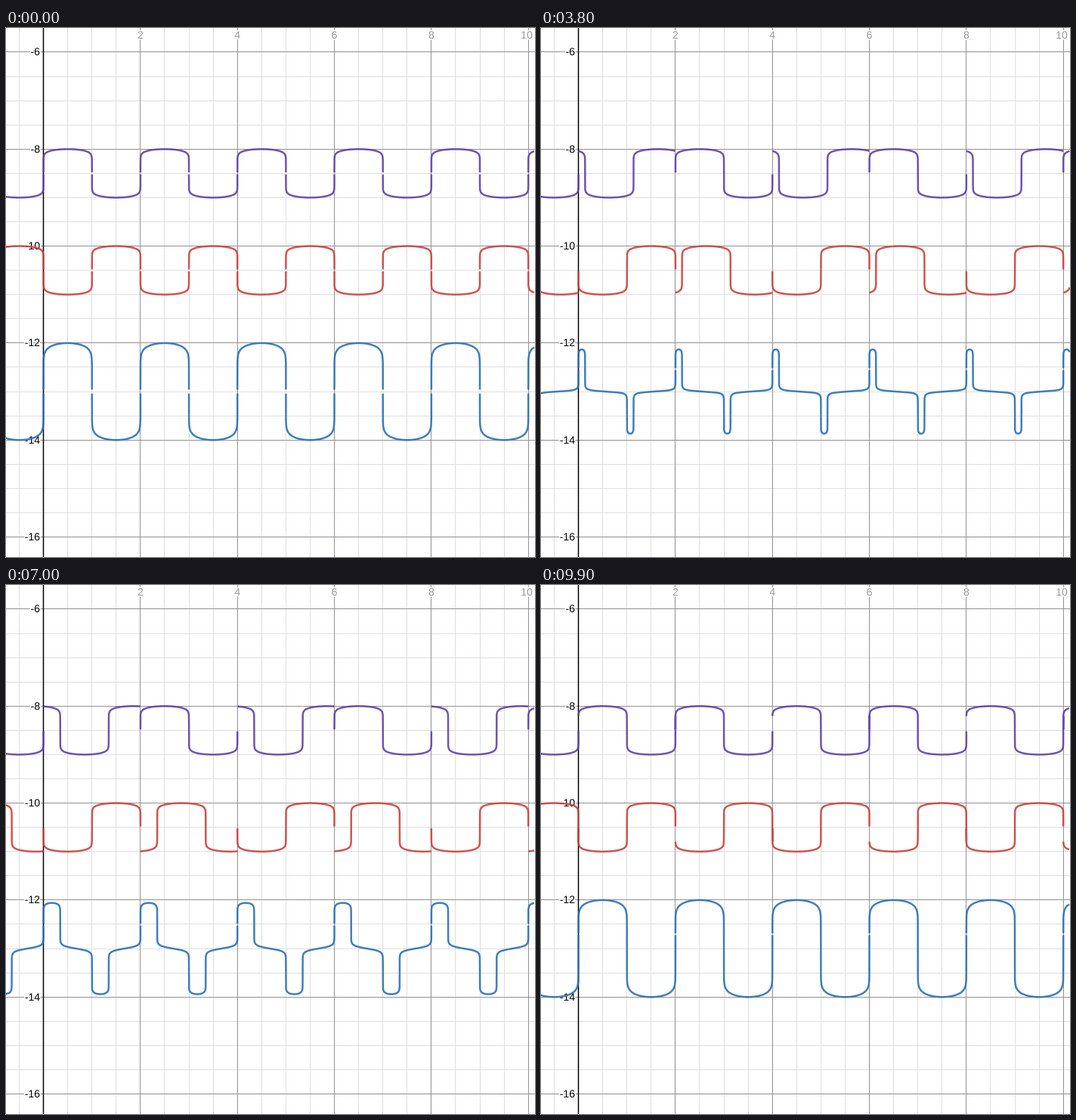
A matplotlib script that plays this animation: 700x700 px, repeating every 10000 ms.

```python
import numpy as np
import matplotlib.pyplot as plt
from matplotlib import patheffects
from matplotlib.animation import FuncAnimation

SIZE, DPI, FRAMES, STEP_MS = 700, 100, 100, 100
PX = 72 / DPI            # one pixel in points
UNIT = 64.16             # pixels per graph unit
X0, Y6 = 49.58, 31.95    # pixel of x = 0 and of y = -6
PURPLE, RED, BLUE = "#6042a6", "#c74440", "#2d70b3"

plt.rcParams["font.family"] = "Liberation Sans"


def px(x):
    return X0 + UNIT * x


def py(y):
    return Y6 - UNIT * (y + 6)


def wave(x):
    """Rounded square wave of period 2 and height 1."""
    s = np.sin(np.pi * x)
    return 0.5 * np.sign(s) * np.abs(s) ** (1 / 11)


NEAR = np.geomspace(1e-16, 1, 120)


def samples(shift):
    """Points on one period, dense around every steep edge."""
    parts = [np.linspace(0, 2, 201)[1:], [1.0, 2.0]]
    for c in (0, 1 - shift, 1, 2 - shift, 2):
        parts += [c - NEAR, c + NEAR]
    u = np.unique(np.concatenate(parts))
    return u[(u > 0) & (u <= 2)]


def curves(shift):
    u = samples(shift)
    still, moved = wave(u), wave(u + shift)
    if shift == 0:
        still[u == 1] = moved[u == 1] = np.nan
    xs, tops, mids = [], [], []
    for start in range(-2, 12, 2):
        a, b = (moved, still) if start % 4 == 0 else (still, moved)
        xs.append(np.append(u + start, np.nan))
        tops.append(np.append(a, np.nan))
        mids.append(np.append(-b, np.nan))
    x, top, mid = map(np.concatenate, (xs, tops, mids))
    x = px(x)
    x[x > SIZE - 0.5] = np.nan   # plot only inside the view
    return x, (py(top - 8.5), py(mid - 10.5), py(top - mid - 13))


fig = plt.figure(figsize=(SIZE / DPI, SIZE / DPI), dpi=DPI, facecolor="white")
ax = fig.add_axes([0, 0, 1, 1])
ax.set_xlim(0, SIZE)
ax.set_ylim(SIZE, 0)
ax.axis("off")


def grid(values, to_px, draw):
    # Lines sit on pixel centres already, so snapping would move them.
    for v in values:
        major = v % 2 == 0
        draw(np.floor(to_px(v)) + 0.5, 0, 1, lw=PX, snap=False,
             color="#919191" if major else "#dedede",
             zorder=2 if major else 1)


def label(x, y, text, color, align):
    halo = patheffects.withStroke(linewidth=3 * PX, foreground="white")
    ax.text(x, y, text, color=color, ha=align, va="baseline",
            fontsize=14 * PX, zorder=4, path_effects=[halo])


grid(np.arange(-0.5, 10.5, 0.5), px, ax.axvline)
grid(np.arange(-16, -5, 0.5), py, ax.axhline)
ax.axvline(np.floor(X0) + 0.5, lw=1.5 * PX, color="black", zorder=3,
           snap=False)

for n in range(2, 11, 2):
    label(min(px(n), 689), 14, str(n), "#999999", "center")
for n in range(-16, -5, 2):
    label(45, np.floor(py(n)) + 5, str(n), "black", "right")

lines = [ax.plot([], [], color=c, lw=2.5 * PX, alpha=0.9, zorder=5,
                 snap=False, solid_capstyle="butt",
                 solid_joinstyle="round")[0]
         for c in (PURPLE, RED, BLUE)]


def update(i):
    shift = (1 - np.cos(2 * np.pi * i / FRAMES)) / 2
    x, ys = curves(shift)
    for line, y in zip(lines, ys):
        line.set_data(x, y)
    return lines


anim = FuncAnimation(fig, update, frames=FRAMES, interval=STEP_MS,
                     repeat=True, repeat_delay=0)
plt.show()
```
